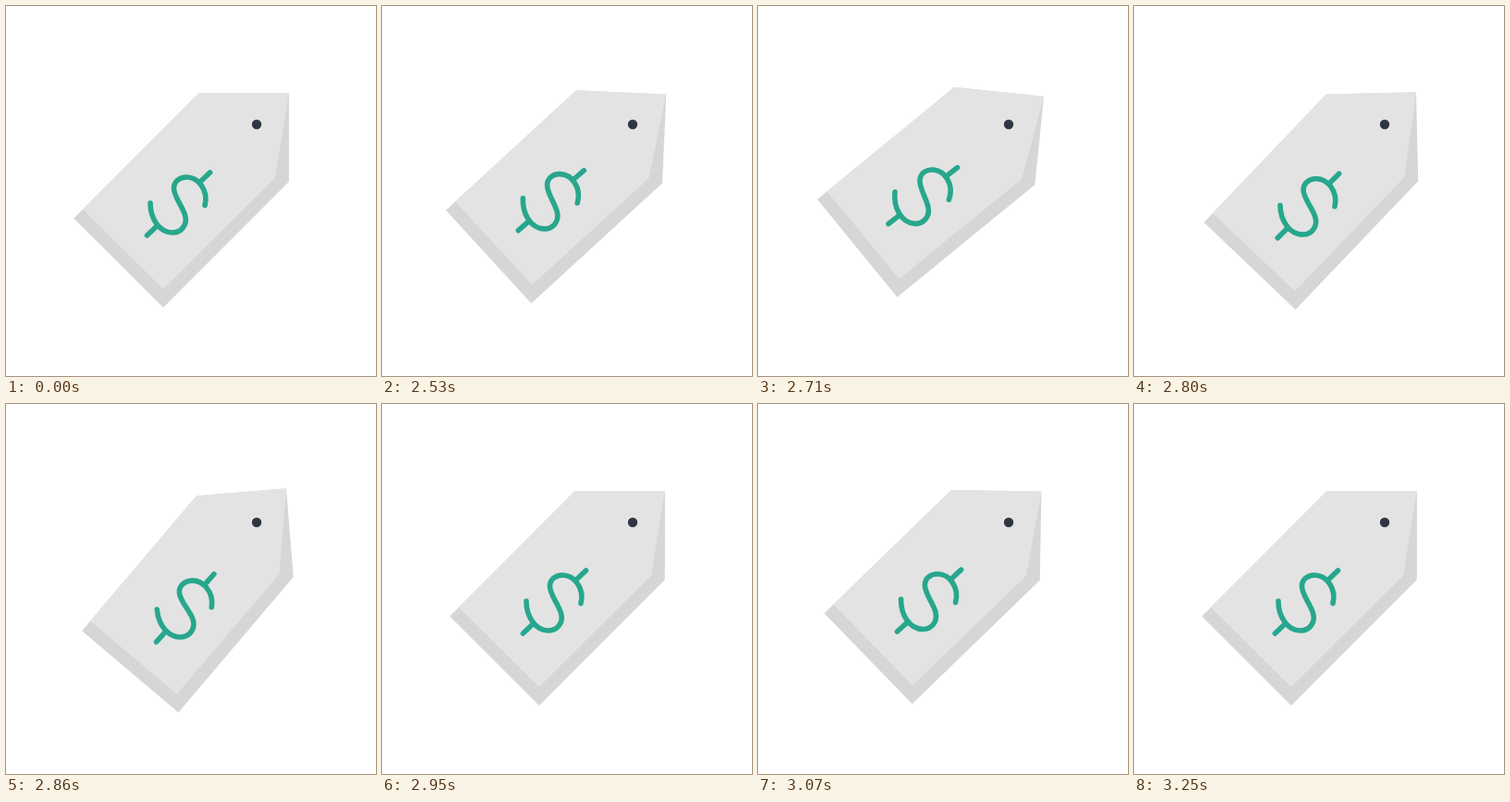
An HTML page that plays this animation: 400 by 400 pixels, repeating every 3.34 s.

```html
<!DOCTYPE html>
<html lang="en">
<head>
<meta charset="utf-8">
<title>Swinging price tag</title>
<style>
  html, body { margin: 0; width: 100%; height: 100%; overflow: hidden; background: #fff; }
  svg { display: block; width: 100%; height: 100%; }
</style>
</head>
<body>
<svg viewBox="0 0 400 400">
  <g id="tag">
    <path fill="#d6d6d6" d="M208.5 94H305.8V190L170 326L73.3 229.5Z"/>
    <path fill="#e3e3e3" d="M208.5 94H305.8L291 185.5L170 306L83 219.8Z"/>
    <g fill="none" stroke="#27a78d" stroke-width="5.6" stroke-linecap="round">
      <path d="M156 213C156 230 166 245 180 245C190 245 196.500 236 193.500 226
               C190.500 216 181.500 206 181.500 197C181.500 189.500 188 185 195 185
               C208 185 219 199 215 215.500"/>
      <path d="M152.500 248L163.500 237.500M209.500 190.500L220.500 180"/>
    </g>
  </g>
  <circle cx="271" cy="128" r="5.2" fill="#2f3542"/>
</svg>
<script>
const LOOP = 3340, START = 2500, STEP = 30;
const tag = document.getElementById('tag');

// Swing extremes: [step, degrees]
const keys = [[-1, 0], [4.6, 8.6], [12.8, -5], [15.9, 1.3], [25, 0]];

function angleAt(step) {
  if (step < 1 || step >= 25) return 0;
  const i = keys.findIndex(([at]) => at > step);
  const [t0, a0] = keys[i - 1], [t1, a1] = keys[i];
  const u = (step - t0) / (t1 - t0);
  return a0 + (a1 - a0) * u * u * (3 - 2 * u);
}

function draw() {
  const time = performance.now() % LOOP;
  const step = Math.floor((time - START) / STEP);
  tag.setAttribute('transform', `rotate(${angleAt(step)} 271 128)`);
  requestAnimationFrame(draw);
}
draw();
</script>
</body>
</html>
```
